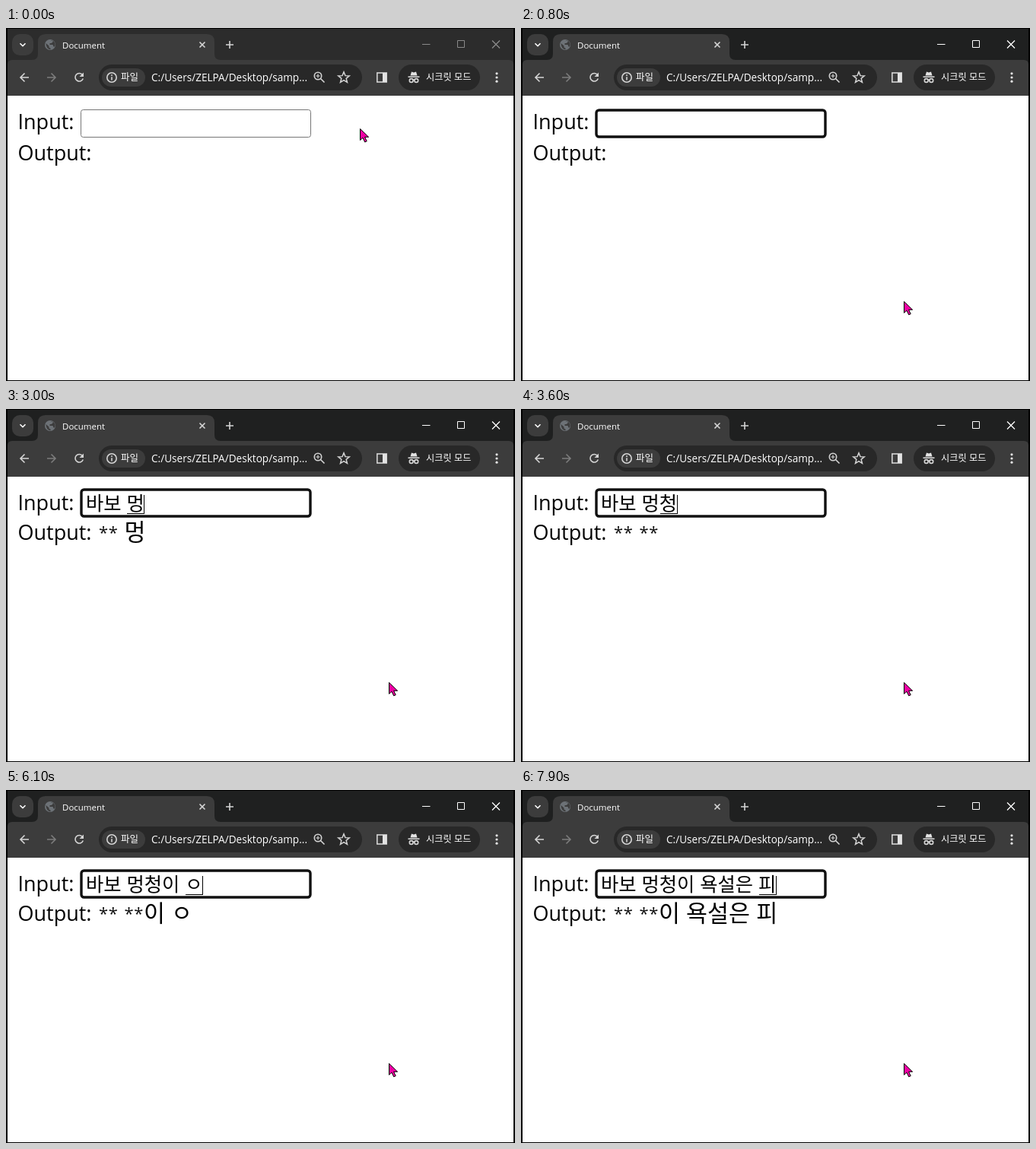
Animation of 669x464 px, one loop 8 s. Source, as an HTML page:

```html
<!DOCTYPE html>
<html lang="ko">
<head>
<meta charset="utf-8">
<title>Document</title>
<style>
  html, body { margin: 0; width: 100%; height: 100%; overflow: hidden; background: #fff; }
  svg { display: block; width: 669px; height: 464px; }
  text { font-family: "Open Sans", "Noto Sans", "Noto Sans CJK KR", sans-serif; white-space: pre; }
  .ko { font-family: "Noto Sans CJK KR", "Noto Sans CJK JP", "Noto Sans CJK", sans-serif; }
  .label { font-size: 27px; }
  .ui { fill: #e3e3e3; }
  text.ui { fill: #fff; }
  .line { fill: none; stroke: #d5d5d5; stroke-width: 1.6; }
  #typed { font-size: 25.33px; font-weight: 300; }
  #result { font-size: 30.4px; font-weight: 300; }
  #stars { font-size: 22px; fill: #111; }
</style>
</head>
<body>
<svg viewBox="0 0 669 464" lang="ko">
  <rect width="669" height="464" fill="#fff"/>

  <!-- tab strip -->
  <rect id="strip" width="669" height="60"/>
  <rect x="8" y="8" width="28" height="28" rx="10" fill="#3c3c3c"/>
  <path class="line" d="M18.5 20.2l3.5 3.5 3.5-3.5" style="stroke:#fff"/>
  <path fill="#3c3c3c" d="M34 42q8 0 8-8V18q0-10 10-10h212q10 0 10 10v16q0 8 8 8z"/>
  <circle cx="58" cy="22" r="7" fill="#6d7277"/>
  <path fill="#3c3c3c" d="M52.500 20l4 3.500v2l2 1v2q-6-1.500-6-8.500zM58 16.500h3.500v2l-2 1.500h-2v2h4l1 2.500h1.500q2-6-3.500-8.500z"/>
  <text class="ui" x="74" y="27" font-size="11.5">Document</text>
  <path class="line" d="M254.500 18.500l7 7m0-7l-7 7"/>
  <path class="line" d="M289 22h10m-5-5v10"/>
  <g id="controls" fill="none">
    <path d="M547 21.500h10.500M593.500 16.500h9v9h-9z"/>
    <path d="M639 16.500l10 10m0-10l-10 10" stroke-width="1.300"/>
  </g>

  <!-- toolbar -->
  <path fill="#3c3c3c" d="M2 89V48q0-6 6-6h653q6 0 6 6v41z"/>
  <path class="line" d="M30 65H19m5.500-5.500L19 65l5.500 5.500"/>
  <path class="line" d="M54 65h11m-5.500-5.500L65 65l-5.500 5.500" style="stroke:#7c7c7c"/>
  <path class="line" d="M100.500 61.500a5.300 5.300 0 1 0 .8 5"/>
  <path fill="#d5d5d5" d="M102 58.500v5.500h-5.500z"/>
  <rect x="122" y="48" width="346" height="34" rx="17" fill="#282828"/>
  <rect x="126" y="53" width="57" height="24" rx="12" fill="#3c3c3c"/>
  <circle class="line" cx="139" cy="65" r="6.200"/>
  <path class="line" d="M139 64.200v4.300M139 61.300v1.600"/>
  <text class="ui ko" x="151" y="69.200" font-size="12.5">파일</text>
  <text class="ui" x="191" y="69.500" font-size="13.6">C:/Users/ZELPA/Desktop/samp...</text>
  <circle class="line" cx="410" cy="63" r="4.700"/>
  <path class="line" d="M413.500 66.500l5 5"/>
  <path class="line" d="M407.500 63h5m-2.500-2.500v5" style="stroke-width:1.200"/>
  <path id="star" class="line" style="stroke-width:1.500"/>
  <rect class="line" x="487.800" y="59" width="12.400" height="12"/>
  <rect x="495" y="59" width="5" height="12" fill="#e3e3e3"/>
  <rect x="516" y="48" width="107" height="34" rx="17" fill="#282828"/>
  <path class="ui" d="M528.500 63.500h15v1.600h-15zM531.500 62.500l1.500-5 3 .9 3-.9 1.500 5z"/>
  <g class="line"><circle cx="532.700" cy="69" r="2.400"/><circle cx="539.300" cy="69" r="2.400"/><path d="M535 68.500q1-.8 2 0"/></g>
  <text class="ui ko" x="552" y="69" font-size="12.2">시크릿 모드</text>
  <g class="ui"><circle cx="645" cy="59.800" r="1.600"/><circle cx="645" cy="65" r="1.600"/><circle cx="645" cy="70.200" r="1.600"/></g>

  <!-- page -->
  <text class="label" x="15.500" y="133">Input:</text>
  <rect id="field" fill="#fff"/>
  <text id="typed" class="ko" y="133"></text>
  <rect id="under" y="137" height="1"/>
  <rect id="caret" y="113" width="1" height="25"/>
  <g id="output">
    <text class="label" x="15.500" y="172">Output:</text>
    <text id="stars" y="170"></text>
    <text id="result" class="ko" y="172.500"></text>
  </g>

  <path fill="none" stroke="#000" d="M0 .5h669M0 463.500h669"/>
  <path fill="none" stroke="#000" stroke-width="2" d="M1 0v464M668 0v464"/>

  <path id="arrow" d="M.5 .5v15l3.500-3.200 2.700 5.700 2.500-1.200-2.600-5.500h5z" fill="#f000a4" stroke="#000"/>
  <path id="beam" d="M-4 .5h3.500q.5 0 .5.500q0-.5.500-.5H4M0 1v16M-4 17.500h3.500q.5 0 .5-.5q0 .5.500.5H4" fill="none" stroke="#222"/>
</svg>
<script>
const LOOP = 8000;
const $ = id => document.getElementById(id);
const set = (id, attrs) => {
  for (const k in attrs) $(id).setAttribute(k, attrs[k]);
};

// time, x, y, text beam?
const pointer = [
  [0, 465, 132], [100, 345, 122, 1], [200, 233, 119, 1],
  [400, 262, 162], [500, 470, 377], [600, 503, 359]
];

// time, committed text, syllable being composed
const typing = [
  [0, '', ''], [1200, '', '바'], [1300, '', '밥'], [1400, '바', '보'],
  [2100, '바보 ', ''], [2800, '바보 ', 'ㅁ'], [2900, '바보 ', '머'], [3000, '바보 ', '멍'],
  [3200, '바보 멍', 'ㅊ'], [3300, '바보 멍', '처'], [3600, '바보 멍', '청'],
  [3800, '바보 멍청', 'ㅇ'], [4000, '바보 멍청', '이'], [4700, '바보 멍청이 ', ''],
  [6100, '바보 멍청이 ', 'ㅇ'], [6200, '바보 멍청이 ', '요'], [6300, '바보 멍청이 ', '욕'],
  [6600, '바보 멍청이 욕', 'ㅅ'], [6700, '바보 멍청이 욕', '서'], [6800, '바보 멍청이 욕', '설'],
  [6900, '바보 멍청이 욕설', 'ㅇ'], [7000, '바보 멍청이 욕설', '으'], [7100, '바보 멍청이 욕설', '은'],
  [7500, '바보 멍청이 욕설은 ', ''], [7800, '바보 멍청이 욕설은 ', 'ㅍ'], [7900, '바보 멍청이 욕설은 ', '피']
];

const FOCUS = 300;
const caretOff = [[0, 300], [800, 1200], [2000, 2100], [2600, 2800], [4400, 4700], [5200, 5600]];

const at = (list, t) => list.filter(s => s[0] <= t).pop();
const advance = c => c === ' ' ? 0.27 : c === '*' ? 0.417 : 0.92;
const width = (str, em) => [...str].reduce((w, c) => w + advance(c) * em, 0);

// Writes the characters that pass the test, each at its own place in the line.
function write(id, str, x, em, keep) {
  const chars = [], xs = [];
  for (const c of str) {
    if (c !== ' ' && keep(c)) { chars.push(c); xs.push(x.toFixed(2)); }
    x += advance(c) * em;
  }
  $(id).textContent = chars.join('');
  set(id, { x: xs.join(' ') });
}

function showText(done, part) {
  const left = 105, em = 25.33;
  const start = left + width(done, em), size = width(part, em);
  write('typed', done + part, left, em, () => true);
  set('under', { x: Math.round(start + 0.8), width: Math.max(0, Math.round(size - 1.5)) });
  set('caret', { x: Math.floor(start + size) });

  const censored = (done + part).replace(/바보|멍청/g, '**');
  write('result', censored, 122, 30.4, c => c !== '*');
  write('stars', censored, 122, 30.4, c => c === '*');
}

function showField(focused, raised) {
  const shift = raised ? 0 : 2;
  set('field', focused
    ? { x: 99, y: 106 + shift, width: 301, height: 35, rx: 3.5, stroke: '#101010', 'stroke-width': 3.4 }
    : { x: 98.5, y: 105.5 + shift, width: 302, height: 36, rx: 3, stroke: '#767676', 'stroke-width': 1 });
  set('output', { transform: `translate(0 ${shift})` });
}

let shown = null;
function draw(t) {
  const state = at(typing, t);
  if (state !== shown) {
    shown = state;
    showText(state[1], state[2]);
  }
  const on = t >= FOCUS;
  showField(on, state !== typing[0]);
  set('strip', { fill: on ? '#1f2020' : '#2c2c2c' });
  set('controls', { stroke: on ? '#fff' : '#8a8a8a' });
  set('caret', { opacity: caretOff.some(([a, b]) => t >= a && t < b) ? 0 : 1 });

  const [, x, y, beam] = at(pointer, t);
  const transform = `translate(${x} ${y})`;
  set('arrow', { transform, opacity: beam ? 0 : 1 });
  set('beam', { transform, opacity: beam ? 1 : 0 });
}

const corners = Array.from({ length: 10 }, (_, i) => {
  const r = i % 2 ? 3.3 : 7.6, a = i * Math.PI / 5;
  return `${(444 + r * Math.sin(a)).toFixed(2)} ${(65.3 - r * Math.cos(a)).toFixed(2)}`;
});
set('star', { d: `M${corners.join('L')}Z` });

const begin = performance.now();
function tick() {
  draw((performance.now() - begin) % LOOP);
  requestAnimationFrame(tick);
}
tick();
</script>
</body>
</html>
```
